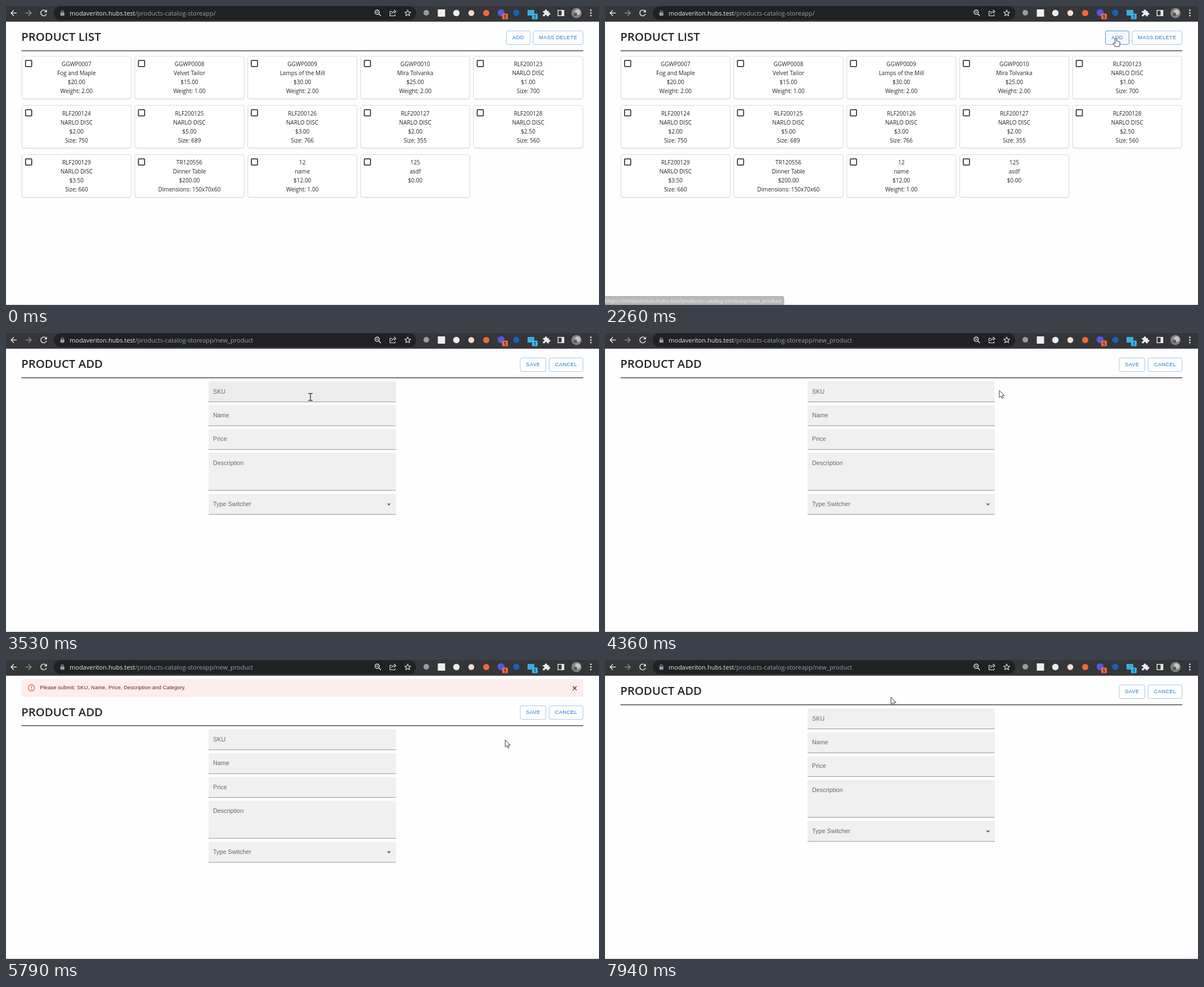
These frames come from a looping animation (1054x532 px, 8 s). An HTML page:

```html
<!DOCTYPE html>
<html lang="en">
<head>
<meta charset="utf-8">
<title>Product list</title>
<style>
html, body { margin: 0; width: 100%; height: 100%; overflow: hidden; background: #fefefe; }
svg { display: block; width: 1054px; height: 532px; }
text { font-family: "Open Sans", "Noto Sans", sans-serif; fill: #212529; white-space: pre; }
.title { font-size: 20.4px; font-weight: 600; }
.card text { font-size: 10px; text-anchor: middle; }
.card rect { fill: #fff; stroke: #d5d9e0; }
.card .box { fill: none; stroke: #18181a; stroke-width: 1.5; }
.btn text { font: 9.33px "Liberation Sans", Arial, sans-serif; letter-spacing: .27px; text-anchor: middle; fill: #1976d2; }
.btn .edge { fill: #fff; stroke: #a3c8ec; stroke-width: 1; }
.btn.on .edge { fill: #f5f9fd; stroke: #5598da; }
.btn circle { fill: #1976d2; }
.field path { fill: #f0f0f0; }
.field.on path { fill: #ececec; }
.field text { font: 10.67px "Liberation Sans", Arial, sans-serif; letter-spacing: .1px; fill: #666; }
.url { font-size: 11px; fill: #e8eaed; }
.line { fill: none; stroke: #e8eaed; stroke-width: 1.4; }
</style>
</head>
<body>
<svg id="stage" viewBox="0 0 1054 532"></svg>
<script>
const LOOP = 8000, SHIFT = 37.2;
const PAGE_CHANGE = 2530, FORM_SHOWN = 3060;
const HOST = 'modaveriton.hubs.test', PATH = '/products-catalog-storeapp/', NEW = 'new_product';

const products = [
  'GGWP0007|Fog and Maple|$20.00|Weight: 2.00',
  'GGWP0008|Velvet Tailor|$15.00|Weight: 1.00',
  'GGWP0009|Lamps of the Mill|$30.00|Weight: 2.00',
  'GGWP0010|Mira Tolvanka|$25.00|Weight: 2.00',
  'RLF200123|NARLO DISC|$1.00|Size: 700',
  'RLF200124|NARLO DISC|$2.00|Size: 750',
  'RLF200125|NARLO DISC|$5.00|Size: 689',
  'RLF200126|NARLO DISC|$3.00|Size: 766',
  'RLF200127|NARLO DISC|$2.00|Size: 355',
  'RLF200128|NARLO DISC|$2.50|Size: 560',
  'RLF200129|NARLO DISC|$3.50|Size: 660',
  'TR120556|Dinner Table|$200.00|Dimensions: 150x70x60',
  '12|name|$12.00|Weight: 1.00',
  '125|asdf|$0.00'
];
// label, top, height
const fields = [
  ['SKU', 86, 37], ['Name', 128.5, 37], ['Price', 170.7, 37],
  ['Description', 213, 67.5], ['Type Switcher', 286.2, 37]
];
// time, x, y of the pointer's hot spot
const route = [
  [450, 881, 437], [580, 849, 356], [910, 849, 355], [1120, 851, 325], [1190, 850, 334],
  [1330, 852, 328], [1600, 884, 180], [1860, 908, 71], [2060, 908, 64], [2200, 908, 57],
  [2860, 908, 57], [2920, 908, 56], [3000, 895, 62], [3330, 545, 110], [3530, 541, 113],
  [3720, 565, 225], [3880, 640, 300], [4040, 818, 245], [4280, 690, 104], [4360, 700, 102],
  [4700, 922, 62], [5050, 934, 54], [5180, 933, 52], [5320, 933, 52], [5790, 887, 142],
  [5980, 888, 140], [6500, 985, 62], [6720, 1003, 44], [6790, 1009, 46],
  [6990, 1010, 47], [7540, 1010, 47], [7940, 508, 66]
];

const text = (x, y, s, attrs = '') => `<text x="${x}" y="${y}" ${attrs}>${s}</text>`;
const circle = (x, y, r, fill) => `<circle cx="${x}" cy="${y}" r="${r}" fill="${fill}"/>`;
const rect = (x, y, w, h, fill, r = 0) =>
  `<rect x="${x}" y="${y}" width="${w}" height="${h}" rx="${r}" fill="${fill}"/>`;
const line = (d, attrs = '') => `<path class="line" d="${d}" ${attrs}/>`;

function card(product, i) {
  const x = 28 + i % 5 * 200.7, y = 89 + Math.floor(i / 5) * 87.6;
  const rows = product.split('|').map((s, k) => text(97.3, 18.2 + k * 16, s)).join('');
  return `<g class="card" transform="translate(${x.toFixed(1)} ${y.toFixed(1)})">
    <rect x=".3" y="1.3" width="194.2" height="76" rx="4" style="fill:#eceef1;stroke:#eceef1"/>
    <rect x=".3" y=".3" width="194.2" height="75.7" rx="3.5"/>
    <rect class="box" x="6.7" y="7.8" width="11" height="11" rx="1"/>${rows}</g>`;
}

function button(id, x, w, label) {
  return `<g class="btn" id="${id}">
    <clipPath id="${id}Clip"><rect x="${x}" y="44" width="${w}" height="25" rx="2.7"/></clipPath>
    <rect class="edge" x="${x + .5}" y="44.3" width="${w - 1}" height="24.2" rx="2.7"/>
    <g clip-path="url(#${id}Clip)"><circle id="${id}Wave" cy="52" r="0"/></g>
    ${text(x + w / 2, 59.3, label)}</g>`;
}

function field([label, y, h], i) {
  const mark = i === 4 ? '<polygon points="677,303.4 684.2,303.4 680.6,307" fill="#666"/>' : '';
  return `<g class="field" id="field${i}">
    <path d="M360 ${y + h}V${y + 2.7}q0-2.7 2.7-2.7H690.3q2.7 0 2.7 2.7V${y + h}Z"/>
    ${rect(360, y + h - .9, 333, .9, '#8c8c8c')}${text(368, y + 21.7, label)}${mark}</g>`;
}

function badge(x, label, fill) {
  return rect(x, 13.5, 10, 10, fill, 1.5) +
    text(x + 5, 21.5, label, 'font-size="8" font-weight="600" text-anchor="middle"');
}

function toolbar() {
  const arrow = line('M19 12.5H9M14 7.5L9 12.5L14 17.5');
  const thin = 'style="stroke-width:1.1"';
  return rect(0, 0, 1054, 28, '#35363a') + rect(0, 27, 1054, 1, '#4b4c50') +
    rect(85, 0.5, 644, 24.5, '#202124', 12.2) + arrow +
    `<g transform="translate(54 0) scale(-1 1)" opacity=".5">${arrow}</g>` +
    line('M71.2 9.2A5.2 5.2 0 1 0 72 14') +
    '<path d="M72.6 6.5V11.3H67.8Z" fill="#e8eaed"/>' +
    rect(96.7, 11.5, 7, 5.8, '#9aa0a6', .8) + line('M98.2 12V10.3a2 2 0 0 1 4 0V12', 'style="stroke:#9aa0a6;stroke-width:1.1"') +
    `<text class="url" x="113" y="16.7">${HOST}<tspan id="path" fill="#9aa0a6"></tspan></text>` +
    // page actions
    '<circle class="line" cx="659.7" cy="11" r="3.8"/>' + line('M662.5 14L666.3 17.8M658 11H661.4') +
    line('M686 9.5H682.5V17.5H691.5V15M685.5 14.5Q686 10 690.5 10', thin) +
    line('M689.5 7L693 10L689.5 13', thin) +
    line('M714 7.3L715.5 10.7L719.2 11.1L716.4 13.5L717.3 17.2L714 15.2L710.7 17.2L711.6 13.5L708.8 11.1L712.5 10.7Z', thin) +
    // extensions
    circle(747, 12, 5, '#9a9ca3') + rect(767.5, 6, 13, 13, '#f0eeee') +
    circle(800.5, 12.5, 5.7, '#e9eeec') + circle(827, 12.5, 5.2, '#f2dccd') +
    circle(853.5, 12.5, 5.5, '#ef6a35') + circle(880, 12, 6.2, '#5558dc') +
    circle(907, 12, 5.5, '#1763b8') + rect(927, 7, 12, 10, '#3fabd9') +
    badge(882, '5', '#ff6a3c') + badge(935, '1', '#35b5ee') +
    '<path d="M954.3 9H957.6a2.1 2.1 0 1 1 4 0H964.8V12a2 2 0 1 1 0 3.8V18.3H961.5a1.9 1.9 0 1 0-3.7 0H954.3V15a1.9 1.9 0 1 0 0-3.6Z" fill="#e8eaed"/>' +
    '<rect class="line" x="981.2" y="7.7" width="10.3" height="9.6"/>' + rect(987.5, 7.5, 4.5, 10, '#e8eaed') +
    circle(1014, 12.5, 9, '#858585') + circle(1016, 11, 5, '#c4c4c4') + circle(1012, 15, 3.2, '#5c5c5c') +
    [7.7, 12.4, 17.1].map(y => circle(1039.5, y, 1.4, '#e8eaed')).join('');
}

const notice = `<clipPath id="noticeClip"><rect id="noticeBox" x="27" y="34" width="1000" height="0"/></clipPath>
  <g clip-path="url(#noticeClip)">${rect(27.5, 34, 998.5, 31.5, '#fdeded', 2.7)}
  <circle cx="45.2" cy="49.5" r="5.6" fill="none" stroke="#e2573f" stroke-width="1.2"/>
  ${rect(44.6, 46.3, 1.2, 4, '#e2573f')}${rect(44.6, 51.4, 1.2, 1.3, '#e2573f')}
  ${text(60.3, 52.3, 'Please submit; SKU, Name, Price, Description and Category.',
    'style="font:9.33px \'Liberation Sans\',Arial,sans-serif;letter-spacing:.13px;fill:#5f2120"')}
  <circle id="closeHover" cx="1010.8" cy="50.2" r="9" fill="#f5e4e4"/>
  <path d="M1007.4 46.8L1014.2 53.6M1014.2 46.8L1007.4 53.6" stroke="#5f2120" stroke-width="1.3"/></g>`;

const pointer = `<g id="pointer" stroke="#222" stroke-width=".9" fill="#fff" stroke-linejoin="round">
  <path id="arrow" d="M.3 .3V12.8L3.2 10.2L5.2 14.6L7.2 13.7L5.2 9.4H9.2Z"/>
  <path id="hand" d="M-1.3 1.2Q0-.8 1.3 1.2V5.4Q3 4.8 3.5 5.9Q5 5.4 5.5 6.6Q7 6.2 7.2 8V11L6 15.2H-1L-5 9.7Q-4.5 7.6-2.8 8.6L-1.3 10Z"/>
  <path id="beam" d="M-3.8-6H-1Q0-6 0-5Q0-6 1-6H3.8M0-5V5.5M-3.8 6.5H-1Q0 6.5 0 5.5Q0 6.5 1 6.5H3.8" fill="none" stroke-width="1.2"/></g>`;

document.getElementById('stage').innerHTML =
  rect(0, 0, 1054, 532, '#fefefe') + rect(0, 530.6, 1054, 1.4, '#d9d9dc') + toolbar() + notice +
  `<g id="page">${text(27.2, 62.4, '', 'id="title" class="title"')}${rect(27.5, 79, 998.5, 1.3, '#32333a')}
    <g id="list">${button('add', 889, 43, 'ADD')}${button('mass', 936.5, 89.5, 'MASS DELETE')}
      ${products.map(card).join('')}</g>
    <g id="edit">${button('save', 913.5, 46.5, 'SAVE')}${button('cancel', 965, 61, 'CANCEL')}
      <g id="form">${fields.map(field).join('')}</g></g></g>
  <g id="status"><path id="bubble" fill="#58595c" stroke="#48494c"/>
    ${text(-.5, 528.3, `https://${HOST}${PATH}${NEW}`, 'style="font-size:9.5px;fill:#dcdde0"')}</g>` + pointer;

const el = {};
document.querySelectorAll('[id]').forEach(node => el[node.id] = node);
const set = (id, name, value) => el[id].setAttribute(name, value);
const show = (id, on) => set(id, 'display', on ? 'inline' : 'none');
const clamp = v => Math.max(0, Math.min(1, v));
const ramp = (t, from, to) => clamp((t - from) / (to - from));
const ease = p => p < .5 ? 4 * p ** 3 : 1 - (2 - 2 * p) ** 3 / 2;

function pointerAt(t) {
  const next = route.findIndex(p => p[0] > t);
  if (next === 0) return route[0].slice(1);
  if (next < 0) return route[route.length - 1].slice(1);
  const [a, b] = [route[next - 1], route[next]];
  const p = ramp(t, a[0], b[0]);
  return [a[1] + (b[1] - a[1]) * p, a[2] + (b[2] - a[2]) * p];
}

function wave(id, t, start, x) {
  const p = ramp(t, start, start + 400);
  set(id, 'cx', x);
  set(id, 'r', p * 30);
  set(id, 'opacity', .26 * (1 - ramp(t, start + 150, start + 450)));
}

function draw(t) {
  const [x, y] = pointerAt(t);
  const editing = t >= PAGE_CHANGE, formOn = t >= FORM_SHOWN;
  const open = ease(ramp(t, 5420, 5720)) - ease(ramp(t, 7540, 7840));
  const py = y - SHIFT * open;

  el.title.textContent = editing ? 'PRODUCT ADD' : 'PRODUCT LIST';
  el.path.textContent = PATH + (editing ? NEW : '');
  show('list', !editing);
  show('edit', editing);
  show('form', formOn);
  set('page', 'transform', `translate(0 ${SHIFT * open})`);
  set('noticeBox', 'height', SHIFT * open);

  const overAdd = !editing && x > 889 && x < 932 && y < 69;
  const overSave = formOn && x > 914 && x < 960 && py > 44 && py < 69;
  const overClose = t >= 6790 && t < 7540;
  el.add.classList.toggle('on', overAdd);
  el.save.classList.toggle('on', overSave);
  show('closeHover', overClose);
  wave('addWave', t, 2390, 908);
  wave('saveWave', t, 5180, 933);

  let over = -1;
  fields.forEach(([, top, h], i) => {
    const on = formOn && x > 360 && x < 693 && py > top && py < top + h;
    if (on) over = i;
    el['field' + i].classList.toggle('on', on);
  });

  const width = 318 + 30 * ramp(t, 2530, 2590);
  set('bubble', 'd', `M-1 533V516.5H${width - 3}q3 0 3 3V533Z`);
  set('status', 'opacity', ramp(t, 2190, 2360) * (1 - ramp(t, 3000, 3190)));

  const hand = overAdd || overClose || over === 4 ||
    (editing && t < 2920) || (overSave && t < 5180);
  const beam = over >= 0 && over < 4;
  show('pointer', t >= 450);
  show('hand', hand);
  show('beam', beam);
  show('arrow', !hand && !beam);
  set('pointer', 'transform', `translate(${x.toFixed(2)} ${y.toFixed(2)})`);
}

function tick() {
  draw(performance.now() % LOOP);
  requestAnimationFrame(tick);
}
tick();
</script>
</body>
</html>
```
